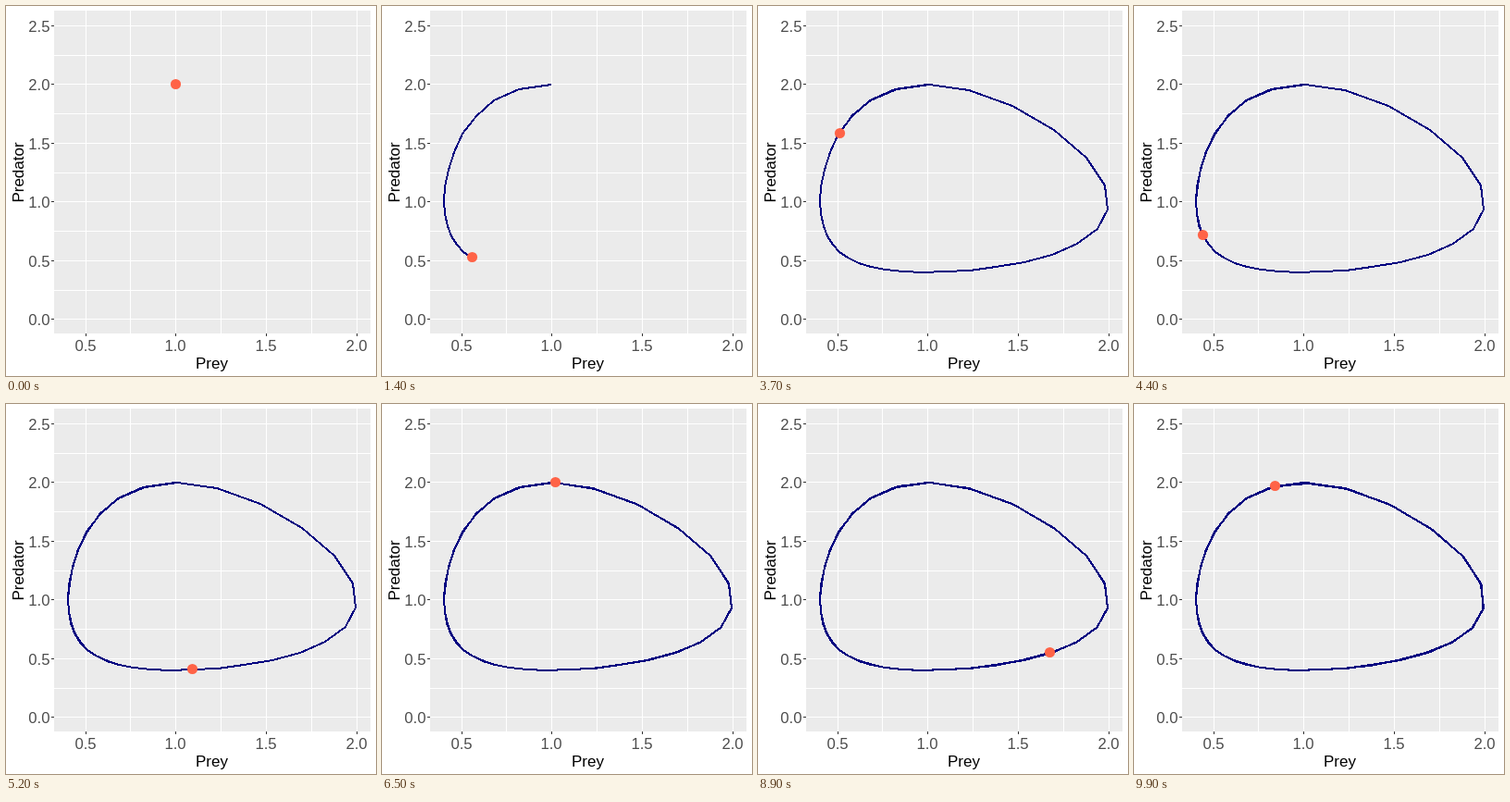
An HTML page for the animation above (10000 ms loop, 400x400 px).

```html
<!DOCTYPE html>
<html lang="en">
<head>
<meta charset="utf-8">
<title>Predator and prey phase plot</title>
<style>
  html, body { margin: 0; width: 100%; height: 100%; overflow: hidden; background: #fff; }
  svg { display: block; width: 400px; height: 400px; }
  text { font: 17px "Liberation Sans", Arial, sans-serif; fill: #000; text-anchor: middle; }
  .label { font-size: 16.7px; fill: #4d4d4d; }
  .label.y { text-anchor: end; }
  .panel { fill: #ebebeb; }
  .grid { stroke: #fff; }
  .tick { stroke: #333; }
  .trail { fill: none; stroke: #000080; stroke-width: 2; stroke-linejoin: round; }
  .dot { fill: #ff6347; }
  .panel, .grid, .tick, .trail { shape-rendering: crispEdges; }
</style>
</head>
<body>
<svg viewBox="0 0 400 400">
  <rect class="panel" x="52" y="5" width="342" height="349"/>
  <g id="axes"></g>
  <text x="222.5" y="392">Prey</text>
  <text transform="translate(19 180) rotate(-90)">Predator</text>
  <polyline class="trail" id="trail" transform="translate(0 1)"/>
  <circle class="dot" id="dot" r="5.6" transform="translate(.5 .5)"/>
</svg>
<script>
const FRAMES = 100, FRAME_MS = 100, STEPS = 100, DT = 0.2;
const axes = document.getElementById('axes');
const trail = document.getElementById('trail');
const dot = document.getElementById('dot');

// Data units to whole device pixels
const toX = prey => Math.round(183.25 + 195.4 * (prey - 1));
const toY = predator => Math.round(338.25 - 126.9 * predator);

function add(tag, attrs, text = '') {
  const el = document.createElementNS('http://www.w3.org/2000/svg', tag);
  for (const key in attrs) el.setAttribute(key, attrs[key]);
  el.textContent = text;
  axes.append(el);
}

function line(cls, x1, y1, x2, y2) {
  add('line', { class: cls, x1, y1, x2, y2 });
}

function drawAxes() {
  for (let v = 0.5; v <= 2; v += 0.25) {
    const x = toX(v) + 0.5;
    line('grid', x, 5, x, 354);
    if (v % 0.5) continue;
    line('tick', x, 354, x, 357);
    add('text', { class: 'label', x: x - 0.5, y: 373 }, v.toFixed(1));
  }
  for (let v = 0; v <= 2.5; v += 0.25) {
    const y = toY(v) + 0.5;
    line('grid', 52, y, 394, y);
    if (v % 0.5) continue;
    line('tick', 49, y, 52, y);
    add('text', { class: 'label y', x: 47.5, y: y + 6.5 }, v.toFixed(1));
  }
}

// Lotka-Volterra with unit rates, integrated by Runge-Kutta
const rate = ([x, y]) => [x * (1 - y), y * (x - 1)];
const move = (p, d, h) => [p[0] + d[0] * h, p[1] + d[1] * h];

function advance(p, h) {
  const a = rate(p);
  const b = rate(move(p, a, h / 2));
  const c = rate(move(p, b, h / 2));
  const d = rate(move(p, c, h));
  return move(p, [0, 1].map(i => a[i] + 2 * b[i] + 2 * c[i] + d[i]), h / 6);
}

function solve() {
  const points = [];
  let p = [1, 2];
  for (let i = 0; i <= STEPS; i++) {
    points.push([toX(p[0]), toY(p[1])]);
    for (let k = 0; k < 10; k++) p = advance(p, DT / 10);
  }
  return points;
}

const orbit = solve();
let shown = -1;

function draw() {
  const frame = Math.floor(performance.now() / FRAME_MS) % FRAMES;
  if (frame !== shown) {
    shown = frame;
    const index = Math.round(frame * STEPS / (FRAMES - 1));
    const [x, y] = orbit[index];
    trail.setAttribute('points', index ? orbit.slice(0, index + 1).join(' ') : '');
    dot.setAttribute('cx', x);
    dot.setAttribute('cy', y);
  }
  requestAnimationFrame(draw);
}

drawAxes();
draw();
</script>
</body>
</html>
```
